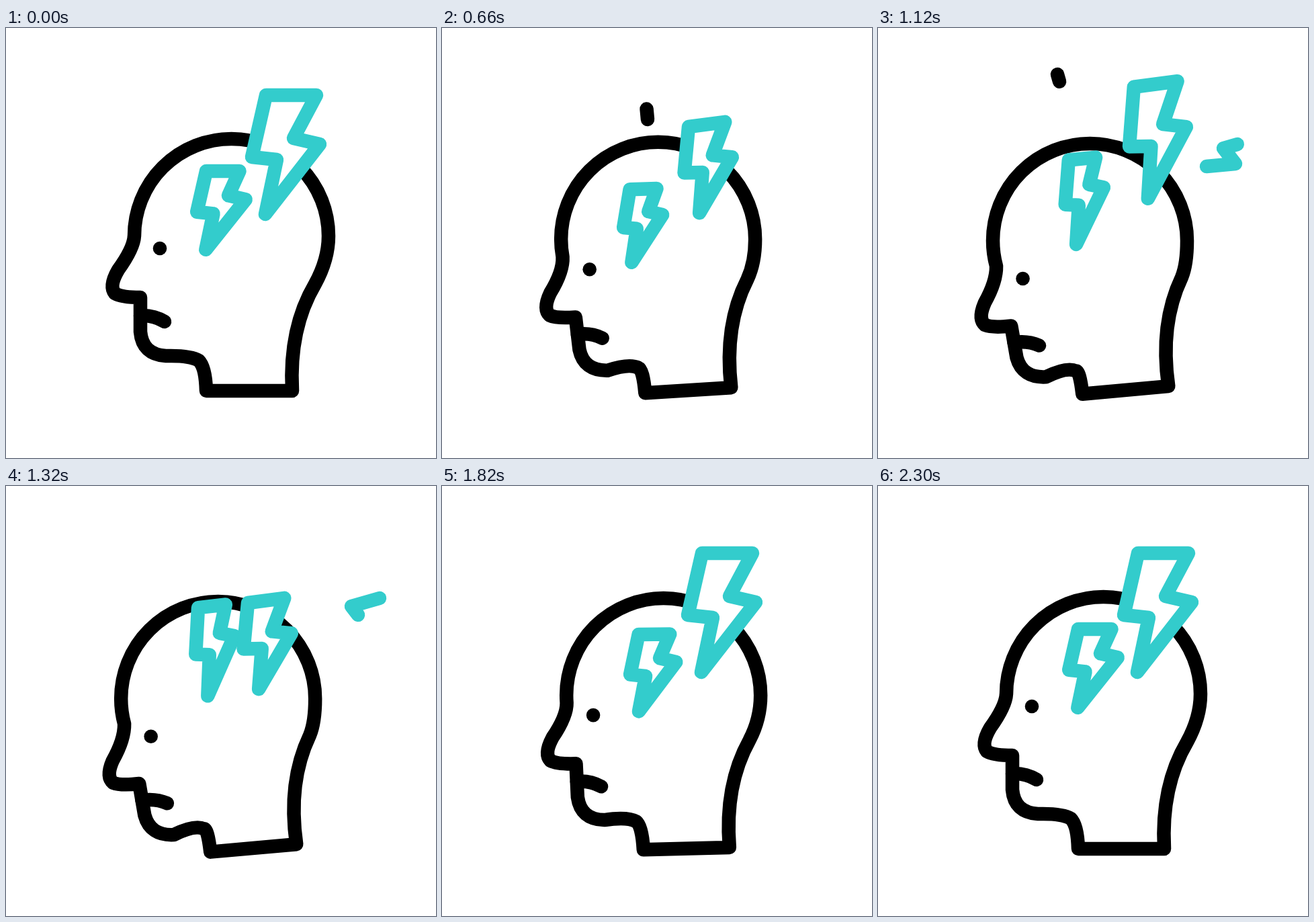
An HTML page with a canvas for the animation above (2.4 s loop, 640 by 640 pixels).

```html
<!DOCTYPE html>
<html lang="en">
<head>
<meta charset="utf-8">
<title>Headache</title>
<style>
html, body { margin: 0; width: 100%; height: 100%; overflow: hidden; background: #fff; }
canvas { display: block; }
</style>
</head>
<body>
<canvas id="stage" width="640" height="640"></canvas>
<script>
const LOOP = 2400;
const BLACK = '#000';
const TEAL = '#33cccc';
const ctx = document.getElementById('stage').getContext('2d');

const mix = (a, b, k) => a + (b - a) * k;
const ramp = (t, from, to) => Math.min(1, Math.max(0, (t - from) / (to - from)));
const easeInOut = (u, power) =>
  u < .5 ? Math.pow(2 * u, power) / 2 : 1 - Math.pow(2 - 2 * u, power) / 2;

function rotate([x, y], angle) {
  const c = Math.cos(angle), s = Math.sin(angle);
  return [x * c - y * s, x * s + y * c];
}

function stroke(color) {
  ctx.strokeStyle = color;
  ctx.stroke();
}

function polyline(points) {
  ctx.beginPath();
  points.forEach(p => ctx.lineTo(...p));
}

// The face swings down and flattens, the neck only tilts;
// share says how much of the face's swing a point follows.
const bend = (bow, share) => (x, y) => {
  const face = [.16 * (y - 412), 42.5 - .11 * (x - 200) - .08 * (y - 400)];
  const neck = [.09 * (y - 470), -.09 * (x - 350)];
  return [
    x + bow * mix(neck[0], face[0], share),
    y + bow * mix(neck[1], face[1], share)
  ];
};

function drawHead(t) {
  const bow = t < 1150
    ? easeInOut(ramp(t, 40, 1120), 3)
    : 1 - easeInOut(ramp(t, 1180, 2280), 3);
  const face = bend(bow, 1), throat = bend(bow, .5), neck = bend(bow, 0);
  const curve = (control, end) => ctx.quadraticCurveTo(...control, ...end);
  const skull = { x: 335.5 - 20 * bow, y: 309.5 + 7 * bow, r: 144.5 };
  const back = skull.x + skull.r;

  ctx.beginPath();
  ctx.moveTo(...neck(298, 540));
  ctx.lineTo(...neck(426, 540));
  curve(neck(421, 447), neck(460, 381));
  curve([back, skull.y + 35], [back, skull.y]);
  ctx.arc(skull.x, skull.y, skull.r, 0, -Math.PI - .265 * bow, true);
  curve(face(190, 328), face(167, 360));
  curve(face(153, 384), face(162, 395));
  curve(face(172, 401), face(200, 401));
  ctx.lineTo(...face(200, 452));
  curve(face(203, 486), face(238, 488));
  curve(throat(274, 487), throat(287, 495));
  curve(neck(297, 505), neck(298, 540));
  ctx.closePath();
  stroke(BLACK);

  ctx.beginPath();
  ctx.moveTo(...face(200, 428));
  curve(face(220, 427), face(236, 437));
  stroke(BLACK);

  ctx.beginPath();
  ctx.arc(...face(229, 328), 10.3, 0, 2 * Math.PI);
  ctx.fillStyle = BLACK;
  ctx.fill();
}

// Pose: x and y of the top left corner, width, height, tilt in degrees.
const bigBolt = {
  size: 1, notch: 0,
  rest: [387, 100, 1, 1, 0],
  dip: [367, 147, .73, .73, -7.5],
  strike: [388, 58, .92, 1.02, -7.5],
  settle: [360, 174, .73, .73, -7.5],
  times: [200, 660, 1010, 1320, 1740]
};
const smallBolt = {
  size: .66, notch: 9,
  rest: [298, 213, 1, 1, 0],
  dip: [277, 244, .78, .92, -2],
  strike: [286, 181, .83, 1.13, -6.5],
  settle: [277, 244, .78, .92, -2],
  times: [330, 770, 1310, 1600, 1945]
};

function poseAt({ rest, dip, strike, settle, times }, t) {
  return [dip, strike, settle, rest].reduce((pose, next, i) => {
    const k = easeInOut(ramp(t, times[i], times[i + 1]), 2);
    return pose.map((v, j) => mix(v, next[j], k));
  }, rest);
}

function drawBolt(bolt, t) {
  const [x, y, width, height, tilt] = poseAt(bolt, t);
  const { size, notch } = bolt;
  const outline = [
    [0, 0], [75, 0], [41 + notch, 64 - notch], [80 + notch, 73 - notch],
    [-1, 177], [16, 96], [-21, 92]
  ];
  polyline(outline.map(([px, py]) => {
    const [dx, dy] = rotate([px * size * width, py * size * height], tilt * Math.PI / 180);
    return [x + dx, y + dy];
  }));
  ctx.closePath();
  ctx.fillStyle = '#fff';
  ctx.fill();
  stroke(TEAL);
}

// A zigzag that grows from its start and is then wiped the same way.
function drawSpark(color, x, y, angle, t) {
  const tip = easeInOut(ramp(t, 568, 928), 2);
  const tail = easeInOut(ramp(t, 840, 1200), 2);
  if (tip <= tail) return;
  const points = [[0, 0], [-4, -43], [-27, -25], [-39, -67]];
  const length = points.slice(1).reduce(
    (sum, p, i) => sum + Math.hypot(p[0] - points[i][0], p[1] - points[i][1]), 0);
  ctx.save();
  ctx.translate(x, y);
  ctx.rotate(angle);
  ctx.setLineDash([length * (tip - tail), length * 2]);
  ctx.lineDashOffset = -length * tail;
  polyline(points);
  stroke(color);
  ctx.restore();
}

function draw() {
  const t = performance.now() % LOOP;
  ctx.fillStyle = '#fff';
  ctx.fillRect(0, 0, 640, 640);
  ctx.lineWidth = 20.5;
  ctx.lineCap = ctx.lineJoin = 'round';
  drawHead(t);
  drawBolt(smallBolt, t);
  drawBolt(bigBolt, t);
  drawSpark(BLACK, 306, 136, 0, t);
  drawSpark(TEAL, 489, 206, Math.PI / 2, t - 304);
  requestAnimationFrame(draw);
}
draw();
</script>
</body>
</html>
```
